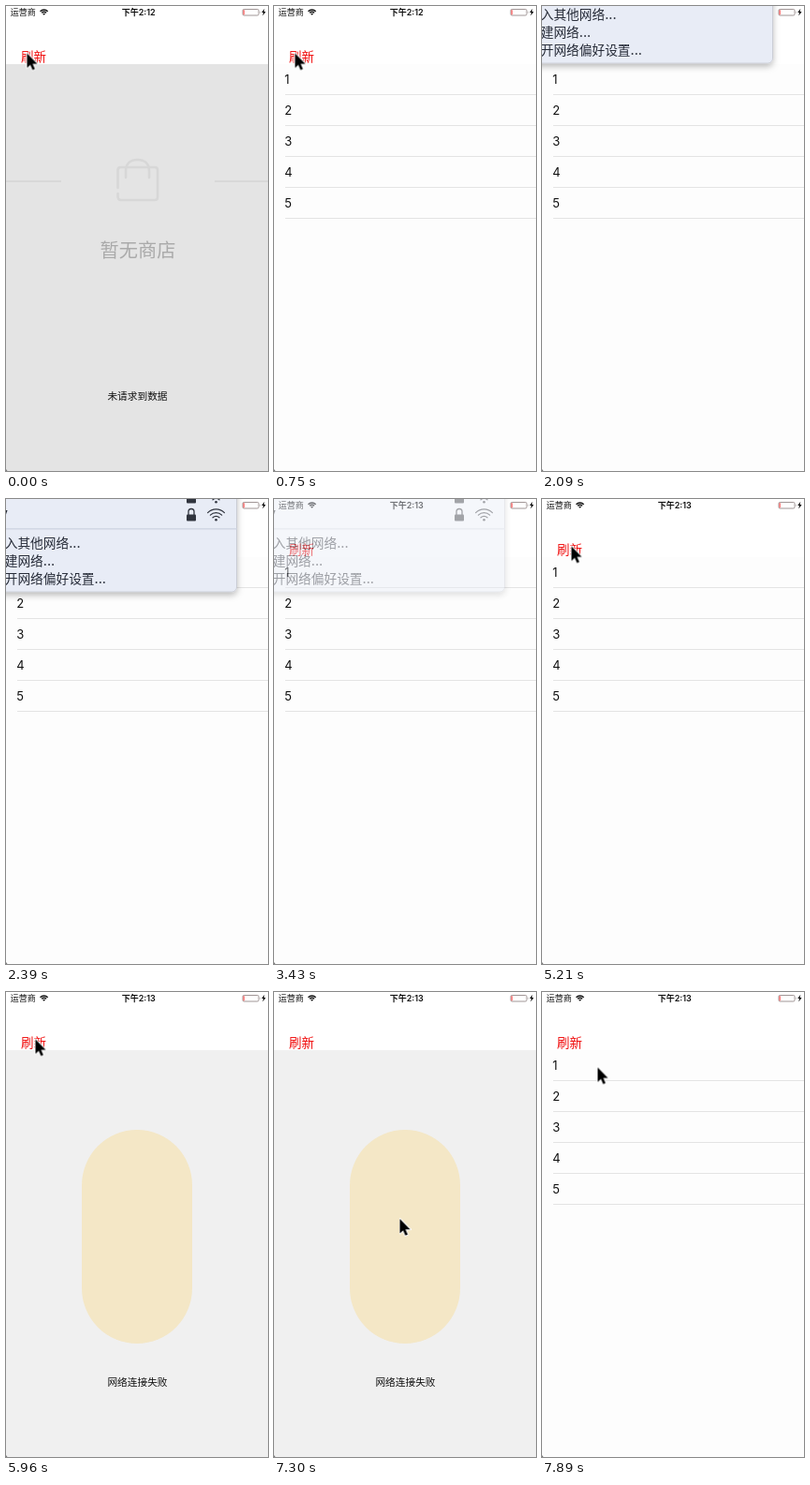
These frames come from a looping animation (280 by 496 pixels, 8000 ms). An HTML page:

```html
<!DOCTYPE html>
<html lang="zh-CN">
<head>
<meta charset="utf-8">
<title>空数据页</title>
<style>
html, body { margin: 0; width: 100%; height: 100%; overflow: hidden; background: #fff; }
svg { display: block; width: 100vw; height: 100vh; }
text { font-family: Inter, "Noto Sans CJK SC", "Noto Sans CJK JP", "Noto Sans CJK", sans-serif; }
.line { fill: none; stroke-linecap: round; stroke-linejoin: round; }

/* every change is a hard cut within one 8 s loop */
.cut { animation: 8s step-end infinite; }
#empty { animation-name: empty; }
#failed { animation-name: failed; }
#early { animation-name: early; }
#late { animation-name: late; }
#menu { animation-name: menu; }
#pointer { animation-name: pointer; }

@keyframes empty {
  0% { opacity: 1; }
  9.375%, 100% { opacity: 0; }
}
@keyframes failed {
  0% { opacity: 0; }
  74.5% { opacity: 1; }
  93.125%, 100% { opacity: 0; }
}
@keyframes early {
  0% { opacity: 1; }
  42.875%, 100% { opacity: 0; }
}
@keyframes late {
  0% { opacity: 0; }
  42.875%, 100% { opacity: 1; }
}
/* grows row by row, then fades */
@keyframes menu {
  0% { opacity: 0; transform: translateY(-38px); }
  26.125% { opacity: 1; transform: translateY(-38px); }
  28% { opacity: 1; transform: translateY(-19px); }
  29.875% { opacity: 1; transform: none; }
  42.875% { opacity: .45; transform: none; }
  44.75%, 100% { opacity: 0; transform: none; }
}
@keyframes pointer {
  0% { transform: translate(22.5px, 50.5px); }
  13% { transform: translate(25px, -30px); }
  54% { transform: translate(25.5px, 1px); }
  55.875% { transform: translate(26px, 12px); }
  57.75% { transform: translate(27px, 25px); }
  59.625% { transform: translate(28.5px, 35px); }
  61.5% { transform: translate(30px, 43px); }
  63.25% { transform: translate(31px, 48px); }
  65.125% { transform: translate(31.5px, 50.5px); }
  83.875% { transform: translate(34px, 68px); }
  85.75% { transform: translate(64px, 130px); }
  87.625% { transform: translate(108px, 205px); }
  89.375% { transform: translate(130px, 237px); }
  91.25% { transform: translate(134.5px, 242px); }
  95% { transform: translate(117px, 190px); }
  96.875% { transform: translate(84.5px, 126px); }
  98.625%, 100% { transform: translate(59.5px, 80.5px); }
}
</style>
</head>
<body>
<svg viewBox="0 0 280 496">
  <defs>
    <filter id="shade" x="-10%" y="-10%" width="120%" height="130%">
      <feDropShadow dx="0" dy="3" stdDeviation="3.5" flood-opacity=".28"/>
    </filter>
    <g id="lock">
      <rect x="-5" y="-1" width="10" height="7" rx="1"/>
      <path class="line" d="M-3 0V-4a3 3 0 0 1 6 0V0" stroke="#30343e" stroke-width="1.3"/>
    </g>
    <g id="wifi">
      <path class="line" d="M-8.9-8.4a12.3 12.3 0 0 1 17.8 0M-6.1-5.8a8.6 8.6 0 0 1 12.2 0M-3.5-3.2a5 5 0 0 1 7 0" stroke="#30343e" stroke-width="1.2"/>
      <circle cy="-.8" r="1.3"/>
    </g>
  </defs>

  <rect width="280" height="496" fill="#fff"/>
  <rect y="62" width="280" height="434" fill="#fdfdfd"/>
  <g id="rows" font-size="13" fill="#111"></g>

  <g id="empty" class="cut">
    <rect y="62" width="280" height="434" fill="#e4e4e4"/>
    <path d="M0 187H59M223 187H280" stroke="#d8d8d8" stroke-width="2"/>
    <g class="line" stroke="#d7d7d7" stroke-width="2.6">
      <path d="M119.5 194V175q0-3 3-3H159q3 0 3 3V204q0 3-3 3H123q-3.5 0-3.5-4V200"/>
      <path d="M128 183V176c0-8 5-12 12.5-12s12.5 4 12.5 12V183"/>
    </g>
    <text x="141" y="268" font-size="20.2" font-weight="300" fill="#aaa" text-anchor="middle">暂无商店</text>
    <text x="140.5" y="420" font-size="10.7" fill="#111" text-anchor="middle">未请求到数据</text>
  </g>

  <g id="failed" class="cut">
    <rect y="62" width="280" height="434" fill="#f0f0f0"/>
    <rect x="81" y="147" width="118" height="228" rx="59" fill="#f4e7c6"/>
    <text x="140.5" y="420" font-size="10.7" fill="#111" text-anchor="middle">网络连接失败</text>
  </g>

  <text x="16" y="59" font-size="13.5" fill="#f00a0a">刷新</text>

  <g font-size="9" fill="#111">
    <text x="4.8" y="9.8">运营商</text>
    <g font-weight="600" text-anchor="middle">
      <text id="early" class="cut" x="141.7" y="9.8">下午2:12</text>
      <text id="late" class="cut" x="141.7" y="9.8">下午2:13</text>
    </g>
  </g>
  <g transform="translate(40.6 9.8)" fill="#111">
    <path d="M-4.1-4.1a5.8 5.8 0 0 1 8.2 0M-2.5-2.5a3.5 3.5 0 0 1 5 0" fill="none" stroke="#111" stroke-width="1.3"/>
    <path d="M0 0L-1.4-1.4a2 2 0 0 1 2.8 0Z"/>
  </g>
  <rect x="253" y="3.5" width="17" height="6.5" rx="1.3" fill="none" stroke="#8a7c7c" stroke-width=".8"/>
  <rect x="253.6" y="4.2" width="1.1" height="5.1" fill="#f44"/>
  <path d="M271 5.5q1.2 1.2 0 2.5Z" fill="#8a7c7c"/>
  <path d="M276.3 2.8L273.2 7H275L274.3 10.4L277.6 5.9H275.7Z" fill="#111"/>

  <path d="M0 494V496H1.5Z" fill="#777"/>

  <g id="menu" class="cut" fill="#30343e">
    <rect x="-30" y="-60" width="276.5" height="159" rx="5" fill="#e8ecf6" stroke="#b9bdc6" stroke-width=".6" filter="url(#shade)"/>
    <rect y="31" width="246.5" height="1.6" fill="#d2d8e5"/>
    <use href="#lock" x="198" y="17.5"/>
    <use href="#lock" x="198" y="-1.5"/>
    <use href="#wifi" x="224.5" y="23"/>
    <use href="#wifi" x="224.5" y="4"/>
    <g font-size="13.7" font-weight="500" fill="#252a36">
      <text x="-6" y="19.5">y</text>
      <text x="-15" y="52">加入其他网络...</text>
      <text x="-15" y="71">创建网络...</text>
      <text x="-15" y="90">打开网络偏好设置...</text>
    </g>
  </g>

  <g id="pointer" class="cut">
    <path d="M0 0V15.5L3.5 12.3L5.9 17.8L8.4 16.7L6 11.3H11Z" stroke="#fff" stroke-width="2" stroke-linejoin="round" paint-order="stroke"/>
  </g>
</svg>
<script>
const rows = document.getElementById("rows");
let markup = "";
for (let i = 0; i < 5; i++) {
  const y = 78 + i * 33;
  markup += `<text x="11.3" y="${y + 4.6}">${i + 1}</text>
    <rect x="12" y="${y + 16}" width="268" height="1" fill="#e4e4e4"/>`;
}
rows.innerHTML = markup;
</script>
</body>
</html>
```
